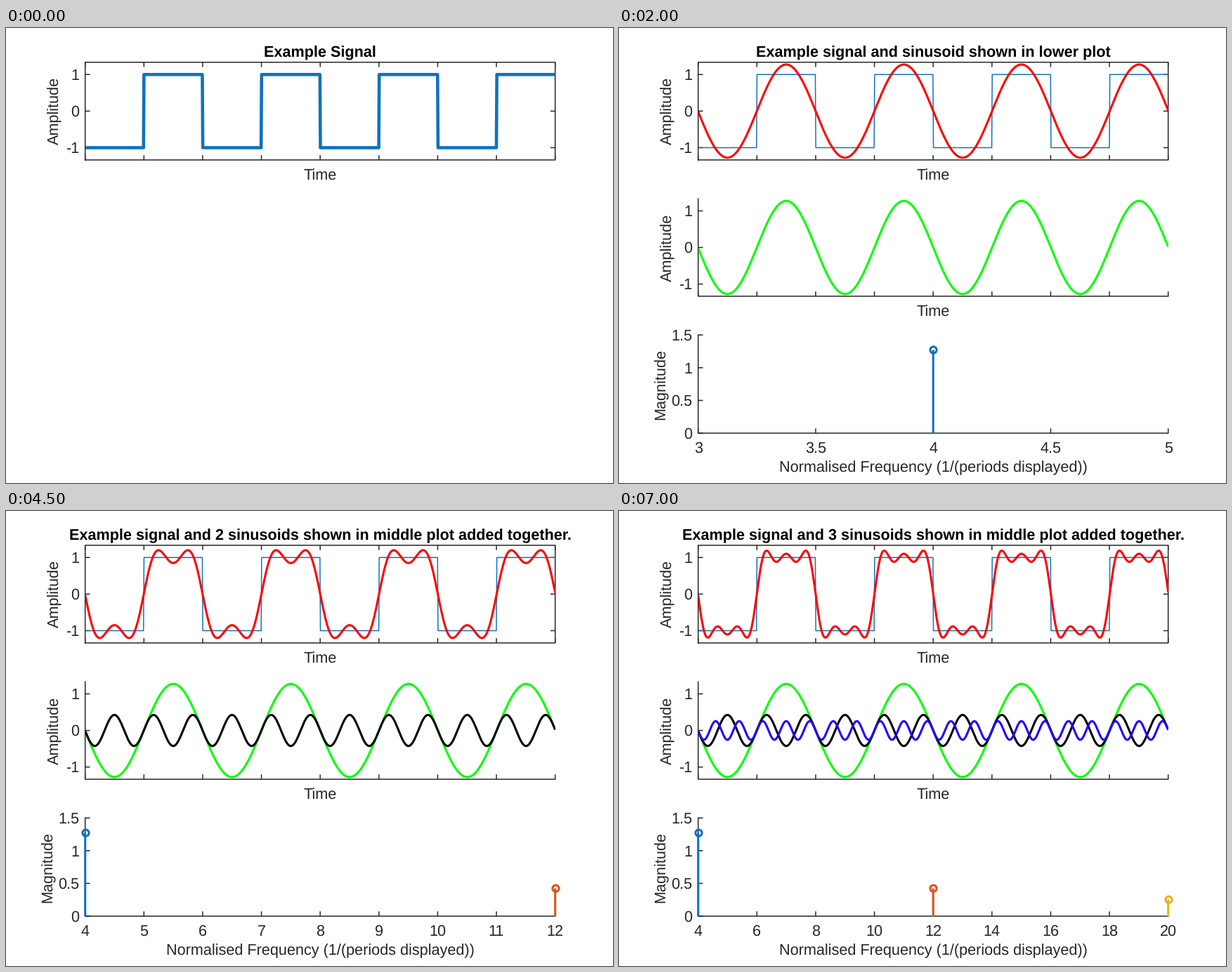
Write a matplotlib script that moves like this. It is 864x648 px and loops after 8 s.

```python
import numpy as np
import matplotlib.pyplot as plt
from matplotlib.animation import FuncAnimation
from matplotlib.patches import Rectangle

plt.rcParams["font.family"] = "Liberation Sans"
plt.rcParams["text.hinting"] = "none"

W, H, DPI = 864, 648, 72
LEFT, RIGHT = 112.7, 781.7
MID = (LEFT + RIGHT) / 2
TOP, MIDDLE, LOW = (48.8, 187.9), (243.1, 382.0), (437.2, 577.0)
UNIT = 52.1          # pixels per unit of amplitude
INK = "#262626"
SIZE = 21.6
TICK = 6.8
THIN, MEDIUM, THICK = 1.5, 3.08, 4.6

WAVES = ["#00ff00", "#000000", "#2400ff"]
STEMS = ["#1072bd", "#d95319", "#edb120"]
TITLES = [
    "Example Signal",
    "Example signal and sinusoid shown in lower plot",
    "Example signal and 2 sinusoids shown in middle plot added together.",
    "Example signal and 3 sinusoids shown in middle plot added together.",
]
# first frequency, last frequency, tick step
RANGES = [None, (3, 5, 0.5), (4, 12, 1), (4, 20, 2)]

N = 1000
t = (np.arange(N) + 0.4) / N
xs = np.linspace(LEFT, RIGHT, N)
square = -np.sign(np.sin(8 * np.pi * t))
harmonics = [-4 / (np.pi * k) * np.sin(8 * np.pi * k * t) for k in (1, 3, 5)]

fig = plt.figure(figsize=(W / DPI, H / DPI), dpi=DPI, facecolor="white")
ax = fig.add_axes([0, 0, 1, 1])


def line(x, y, color=INK, width=THIN, cap="butt", **kw):
    return ax.plot(x, y, color=color, lw=width, solid_capstyle=cap,
                   solid_joinstyle="round", snap=False, **kw)[0]


def text(x, y, s, ha="center", color=INK, **kw):
    ax.text(x, y, s, ha=ha, va="baseline", color=color, fontsize=SIZE,
            rotation_mode="anchor", **kw)


def frame(rows, n_ticks, y_ticks, boxed):
    """Axis lines with inward ticks; y_ticks holds (pixel, label) pairs."""
    y0, y1 = rows
    if boxed:
        line([LEFT, RIGHT, RIGHT, LEFT, LEFT], [y1, y1, y0, y0, y1],
             cap="projecting")
    else:
        line([LEFT, LEFT, RIGHT], [y0, y1, y1], cap="projecting")
    for x in np.linspace(LEFT, RIGHT, n_ticks):
        line([x, x], [y1, y1 - TICK])
        if boxed:
            line([x, x], [y0, y0 + TICK])
    for y, label in y_ticks:
        line([LEFT, LEFT + TICK], [y, y])
        if boxed:
            line([RIGHT, RIGHT - TICK], [y, y])
        text(104.5, y + 7.7, label, ha="right")


def time_plot(rows, curves, boxed):
    y0, y1 = rows
    centre = (y0 + y1) / 2
    frame(rows, 9, [(centre - UNIT * v, str(v)) for v in (1, 0, -1)], boxed)
    text(75, centre, "Amplitude", rotation=90)
    text(MID, y1 + 28.8, "Time")
    clip = Rectangle((LEFT, y0), RIGHT - LEFT, y1 - y0, transform=ax.transData)
    for values, color, width in curves:
        curve = line(xs, centre - UNIT * values, color, width)
        curve.set_clip_path(clip)


def spectrum(count):
    first, last, step = RANGES[count]
    y0, y1 = LOW
    scale = (y1 - y0) / 1.5
    freqs = np.arange(first, last + step / 2, step)
    frame(LOW, len(freqs), [(y1 - scale * v, f"{v:g}")
                            for v in (0, 0.5, 1, 1.5)], False)
    for f, x in zip(freqs, np.linspace(LEFT, RIGHT, len(freqs))):
        text(x, 605, f"{f:g}")
    text(65.3, (y0 + y1) / 2, "Magnitude", rotation=90)
    text(MID, 632.5, "Normalised Frequency (1/(periods displayed))")
    for k, color in zip((1, 3, 5), STEMS[:count]):
        x = LEFT + (4 * k - first) / (last - first) * (RIGHT - LEFT)
        y = y1 - scale * 4 / (np.pi * k)
        line([x, x], [y1, y], color, MEDIUM)
        line([x], [y], color, 0, marker="o", markersize=9.2,
             markerfacecolor="none", markeredgewidth=MEDIUM)


def draw(n):
    count = (n + 4) // 5      # sinusoids shown
    ax.clear()
    ax.set(xlim=(0, W), ylim=(H, 0))
    ax.axis("off")
    text(MID, 41, TITLES[count], color="black", weight="bold")
    if count == 0:
        time_plot(TOP, [(square, STEMS[0], THICK)], True)
        return []
    parts = harmonics[:count]
    time_plot(TOP, [(square, STEMS[0], THIN),
                    (sum(parts), "#ff0000", MEDIUM)], True)
    time_plot(MIDDLE, [(p, c, MEDIUM) for p, c in zip(parts, WAVES)], False)
    spectrum(count)
    return []


anim = FuncAnimation(fig, draw, frames=16, interval=500, repeat=True,
                     init_func=lambda: [], blit=False)
plt.show()
```
